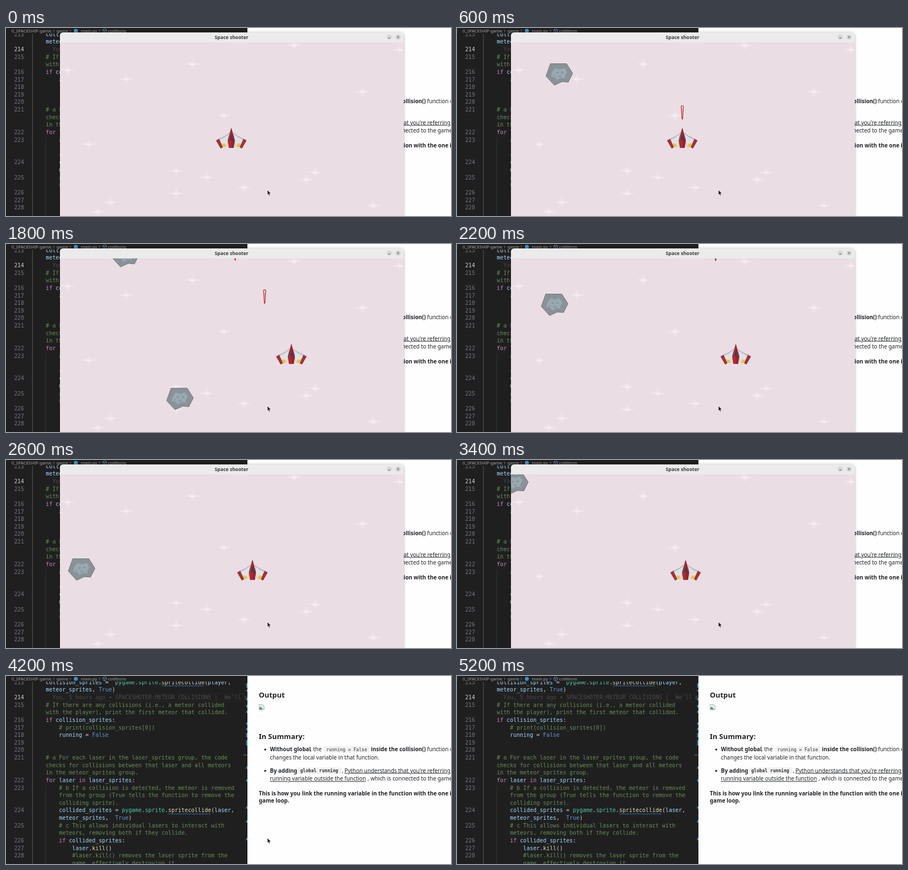
These frames come from a looping animation (800x340 px, 5.4 s). An HTML page:

```html
<!DOCTYPE html>
<html lang="en">
<head>
<meta charset="utf-8">
<style>
  html, body { margin: 0; width: 100%; height: 100%; overflow: hidden; background: #fff; }
  svg { display: block; width: 800px; height: 340px; }
  text { white-space: pre; }
  .code { font: 9.88px "DejaVu Sans Mono", monospace; }
  .doc { font: 9.9px "Noto Sans", "Open Sans", sans-serif; fill: #1f2226; }
  .h { font-size: 12.9px; font-weight: 700; }
  .u { text-decoration: underline; }
  .chip { font: 8.1px "DejaVu Sans Mono", monospace; fill: #333; }
  .b { font-weight: 700; }
  .crumb { font: 7.8px "Noto Sans", sans-serif; fill: #a4a4a4; }
  .title { font: 700 8.6px "Noto Sans", sans-serif; fill: #3a3a3a; }
</style>
</head>
<body>
<svg viewBox="0 0 800 340">
  <defs>
    <clipPath id="field"><rect x="97" y="26" width="617.5" height="314"/></clipPath>
    <filter id="shadow"><feDropShadow dx="0" dy="1" stdDeviation="2.5" flood-opacity=".4"/></filter>
    <path id="star" d="M-11 0H11M0-8V8M-3-4V3M3-3V4M-5 1.5H5" fill="none" stroke="#f8f2f5" stroke-width="1"/>
    <g id="meteor">
      <path d="M-16-19.5H13L24-2L16 14L5 13L-9 19.5L-24 3Z" fill="#899297" stroke="#70777b"/>
      <path d="M-13-5L-7-12L0-9L9-12L14-4L10 2L11 7L3 6L-4 10L-8 5L-15 4Z" fill="#9aa9b1"/>
      <path d="M-6-3l3-2l2 2l-3 2zM3-5l4 0l0 3l-3 0zM-2 3l4-1l1 3l-4 0zM-11 1l3 0l0 2l-3 0z" fill="#83929b"/>
    </g>
    <g id="laser">
      <path d="M-2-11.5Q0-13 2-11.5L.5 12H-.5Z" fill="#e9dfd8" stroke="#bb2a30" stroke-width="1.2"/>
      <path d="M0-7V6" stroke="#9b8c86" stroke-width=".7"/>
    </g>
    <g id="ship">
      <g id="wing">
        <path d="M-3-10Q-10-3-24 2" fill="none" stroke="#8b9198" stroke-width=".9"/>
        <path d="M-5-8Q-12-1-22 3L-16 15.5L-9 15L-6 7Z" fill="#dfe2e5" stroke="#a9afb4" stroke-width=".6"/>
        <path d="M-17 9.5H-11L-10 14.5L-15 15.5Z" fill="#f0c52e"/>
        <path d="M-27 4L-22 1.5L-15.5 16L-19 18Z" fill="#b32c31" stroke="#5b3034" stroke-width=".7"/>
      </g>
      <use href="#wing" transform="scale(-1 1)"/>
      <path d="M0-18L6 4L4 17H-4L-6 4Z" fill="#b8282f" stroke="#6c262b" stroke-width=".7"/>
      <path d="M0-18L6 4L4 17H1L0 4Z" fill="#97242b"/>
      <path d="M0-8L3 2L0 4L-3 2Z" fill="#35445e"/>
    </g>
  </defs>

  <rect width="800" height="340" fill="#fefefe"/>
  <g id="doc"></g>
  <g id="editor">
    <rect width="434" height="340" fill="#201f20"/>
    <path d="M72 31.8H428M72 45.7H428" stroke="#292929"/>
    <path d="M47.5 10V340" stroke="#555"/>
    <path d="M71.5 198V340" stroke="#363636" stroke-width=".8"/>
  </g>
  <g id="window">
    <path d="M97 340V14Q97 8 103 8H708.5Q714.5 8 714.5 14V340Z" fill="#ebebeb" filter="url(#shadow)"/>
    <text class="title" x="405.5" y="19.6" text-anchor="middle">Space shooter</text>
    <g fill="#d9d9d9" stroke="#555" stroke-width="1">
      <circle cx="689" cy="16.5" r="5" stroke="none"/><path d="M687 18H691"/>
      <circle cx="705" cy="16.5" r="5" stroke="none"/><path d="M703.2 14.7l3.6 3.6m0-3.6l-3.6 3.6"/>
    </g>
    <g clip-path="url(#field)">
      <rect x="97" y="26" width="618" height="314" fill="#ebdde4"/>
      <g id="stars"></g>
      <g id="actors"></g>
      <use id="player" href="#ship"/>
    </g>
  </g>
  <path id="cursor" d="M470 293V302L472 300.2L473.4 303.2L474.9 302.5L473.5 299.6H476.3Z" fill="#111" stroke="#fff" stroke-width=".6"/>
</svg>
<script>
const $ = id => document.getElementById(id);
const NS = 'http://www.w3.org/2000/svg';

function add(parent, tag, attrs, content) {
  const el = document.createElementNS(NS, tag);
  for (const k in attrs) el.setAttribute(k, attrs[k]);
  if (content) el.textContent = content;
  return parent.appendChild(el);
}

// Code editor
const editor = $('editor'), LEFT = 71.5, CHAR = 5.948;
const rowY = r => 42 + 13.63 * r;
const COMMENT = '#629150';
const palette = [
  [/^(if|for|in)$/, '#c586c0'], [/^(True|False)$/, '#569cd6'],
  [/^(pygame|sprite)$/, '#4ec9b0'], [/^(spritecollide|kill)$/, '#dcdcaa'],
  [/^\w/, '#9cdcfe'], [/./, '#d0d0d0']
];

// [row, indent, code, line number]; a leading ~ continues a comment
const lines = [
  [-2, 0, 'collision_sprites =  pygame.sprite.spritecollide(player,', 213],
  [-1, 0, 'meteor_sprites, True)'],
  [0, 0, '', 214],
  [1, 0, '# If there are any collisions (i.e., a meteor collided', 215],
  [2, 0, '~with the player), print the first meteor that collided.'],
  [3, 0, 'if collision_sprites:', 216],
  [4, 4, '# print(collision_sprites[0])', 217],
  [5, 4, 'running = False', 218],
  [6, 0, '', 219],
  [7, 0, '', 220],
  [8, 0, '# a For each laser in the laser_sprites group, the code', 221],
  [9, 0, '~checks for collisions between that laser and all meteors'],
  [10, 0, '~in the meteor_sprites group.'],
  [11, 0, 'for laser in laser_sprites:', 222],
  [12, 4, '# b If a collision is detected, the meteor is removed', 223],
  [13, 4, '~from the group (True tells the function to remove the'],
  [14, 4, '~colliding sprite).'],
  [15, 4, 'collided_sprites = pygame.sprite.spritecollide(laser,', 224],
  [16, 4, 'meteor_sprites,  True)'],
  [17, 4, '# c This allows individual lasers to interact with', 225],
  [18, 4, '~meteors, removing both if they collide.'],
  [19, 4, 'if collided_sprites:', 226],
  [20, 8, 'laser.kill()', 227],
  [21, 8, '#laser.kill() removes the laser sprite from the', 228],
  [22, 8, '~game, effectively destroying it']
];
for (const [row, indent, code, number] of lines) {
  const x = LEFT + indent * CHAR, y = rowY(row);
  if (number) add(editor, 'text', { class: 'code', x: 32.5, y, 'text-anchor': 'end', fill: number == 214 ? '#cccccc' : '#6e7681' }, String(number));
  const line = add(editor, 'text', { class: 'code', x, y });
  if (/^[#~]/.test(code)) add(line, 'tspan', { fill: COMMENT }, code.replace('~', ''));
  else for (const word of code.match(/\w+|\W+/g) || [])
    add(line, 'tspan', { fill: palette.find(p => p[0].test(word))[1] }, word);
  const call = code.indexOf('spritecollide');
  if (call > 0) add(editor, 'path', {
    d: `M${x + call * CHAR} ${y + 3}` + 'q1-2 2 0t2 0'.repeat(19), fill: 'none', stroke: '#3794ff', 'stroke-width': .9
  });
}
add(editor, 'text', { class: 'code', x: 83.5, y: rowY(0), fill: '#4c4c4c' }, "You, 5 hours ago • SPACESHOTER:METEOR COLLISIONS |  We'll m");
add(editor, 'path', { d: 'M427 143H434', stroke: '#777' });
add(editor, 'path', {
  d: 'M433 13V21M433 25V28M433 40V44M433 52V57M433 63V67M433 84V88M433 94V98M433 103V111M433 116V126M433 164V168M433 187V191M433 236V240M433 261V265M433 293V297',
  stroke: '#3f7fb5', 'stroke-width': 2.5
});
add(editor, 'rect', { x: 434, width: 20, height: 340, fill: '#fefefe' });
add(editor, 'rect', { width: 434, height: 10, fill: '#201f20' });
for (const [x, word] of [[10, '0_SPACESHIP-game'], [91, 'game'], [134.5, 'main.py'], [183.5, 'collitions']])
  add(editor, 'text', { class: 'crumb', x, y: 8.2 }, word);
add(editor, 'path', { d: 'M84.5 3l2.2 2.3l-2.2 2.3M114.5 3l2.2 2.3l-2.2 2.3M167 3l2.2 2.3l-2.2 2.3', fill: 'none', stroke: '#999', 'stroke-width': .8 });
add(editor, 'circle', { cx: 125.5, cy: 5.2, r: 3.6, fill: '#3f8fc4' });
add(editor, 'path', { d: 'M177.5 1.5l3.4 1.8v3.8l-3.4 2l-3.4-2v-3.8zM174.1 3.3l3.4 1.9l3.4-1.9M177.5 5.2v3.9', fill: 'none', stroke: '#5f9fd6', 'stroke-width': .8 });

// Document pane
const doc = $('doc');
for (const [x, width, y] of [[571.5, 82, 127], [525, 78, 165.5]])
  add(doc, 'rect', { x, y, width, height: 11.5, rx: 2, fill: '#f1f1f2' });
const prose = [
  ['h', 454.5, 38.5, 'Output'],
  ['h', 454.5, 113.5, 'In Summary:'],
  ['b', 474.5, 136.3, 'Without global'],
  ['', 547, 136.3, ', the'],
  ['chip', 576, 135.7, 'running = False'],
  ['b', 656, 136.3, 'inside the collision()'],
  ['', 757, 136.3, 'function only'],
  ['', 474.5, 151.3, 'changes the local variable in that function.'],
  ['b', 474.5, 174.5, 'By adding'],
  ['chip b', 529, 174, 'global running'],
  ['', 604, 174.5, ','],
  ['u', 608.5, 174.5, "Python understands that you're referring to the"],
  ['u', 474.5, 189.3, 'running variable outside the function'],
  ['', 650, 189.3, ', which is connected to the game loop'],
  ['b', 454.5, 215.5, 'This is how you link the running variable in the function with the one in the'],
  ['b', 454.5, 228.5, 'game loop.']
];
for (const [style, x, y, words] of prose) add(doc, 'text', { class: 'doc ' + style, x, y }, words);
for (const cy of [133, 171.5]) add(doc, 'circle', { cx: 466, cy, r: 1.8, fill: '#222' });
add(doc, 'path', { d: 'M455 51.5H461.5L464 54V61H455Z', fill: '#e3ecf5', stroke: '#9aa3ab', 'stroke-width': .8 });
add(doc, 'path', { d: 'M455.5 60.5V58L458 55.5L462 60.5Z', fill: '#4f9d4a' });

// Game
const stars = [[518, 31], [708, 39], [335, 65], [111, 76], [216, 92], [641, 115], [392, 158], [148, 210], [306, 258],
  [361, 270], [556, 261], [540, 274], [428, 288], [306, 299], [188, 315], [660, 321], [165, 332]];
for (const [x, y] of stars) add($('stars'), 'use', { href: '#star', x, y });

const place = (el, x, y) => el.setAttribute('transform', `translate(${x} ${y})`);
const show = (el, on) => el.style.display = on ? '' : 'none';

// Each body passes (x, y) at time `at`; speeds in px per ms
const bodies = [
  ['meteor', 278, 140.5, .058, .233, 1200],
  ['meteor', 184, 225, 0, .235, 1200],
  ['meteor', 437, 15, -.08, .22, 1200, 1400],
  ['meteor', 215, 22, -.0988, .22, 1800],
  ['meteor', 104, 42, 0, .22, 3400],
  ['laser', 405, 168, 0, -.193, 521, 1400],
  ['laser', 412, 168, 0, -.193, 1019],
  ['laser', 465, 168, 0, -.193, 1422]
].map(([kind, x, y, vx, vy, at, end = 3600]) => ({
  x, y, vx, vy, at, end,
  start: kind == 'laser' ? at : 0,
  el: add($('actors'), 'use', { href: '#' + kind })
}));

const shipPath = [[0, 405], [1000, 405], [1200, 433], [1800, 513], [1960, 536], [2600, 443], [2820, 411], [5400, 411]];
function shipX(t) {
  const i = shipPath.findIndex(p => p[0] > t);
  const [t0, x0] = shipPath[i - 1], [t1, x1] = shipPath[i];
  return x0 + (x1 - x0) * (t - t0) / (t1 - t0);
}

const LOOP = 5400, STEP = 200, GAME_END = 3600, CURSOR_END = 4600;
function draw(now) {
  const t = Math.floor(now % LOOP / STEP) * STEP;
  show($('window'), t < GAME_END);
  show($('cursor'), t < CURSOR_END);
  place($('player'), shipX(t), 199.5);
  for (const b of bodies) {
    show(b.el, t >= b.start && t < b.end);
    place(b.el, b.x + b.vx * (t - b.at), b.y + b.vy * (t - b.at));
  }
}
let begin;
function tick(now) {
  begin ??= now;
  draw(now - begin);
  requestAnimationFrame(tick);
}
draw(0);
requestAnimationFrame(tick);
</script>
</body>
</html>
```
